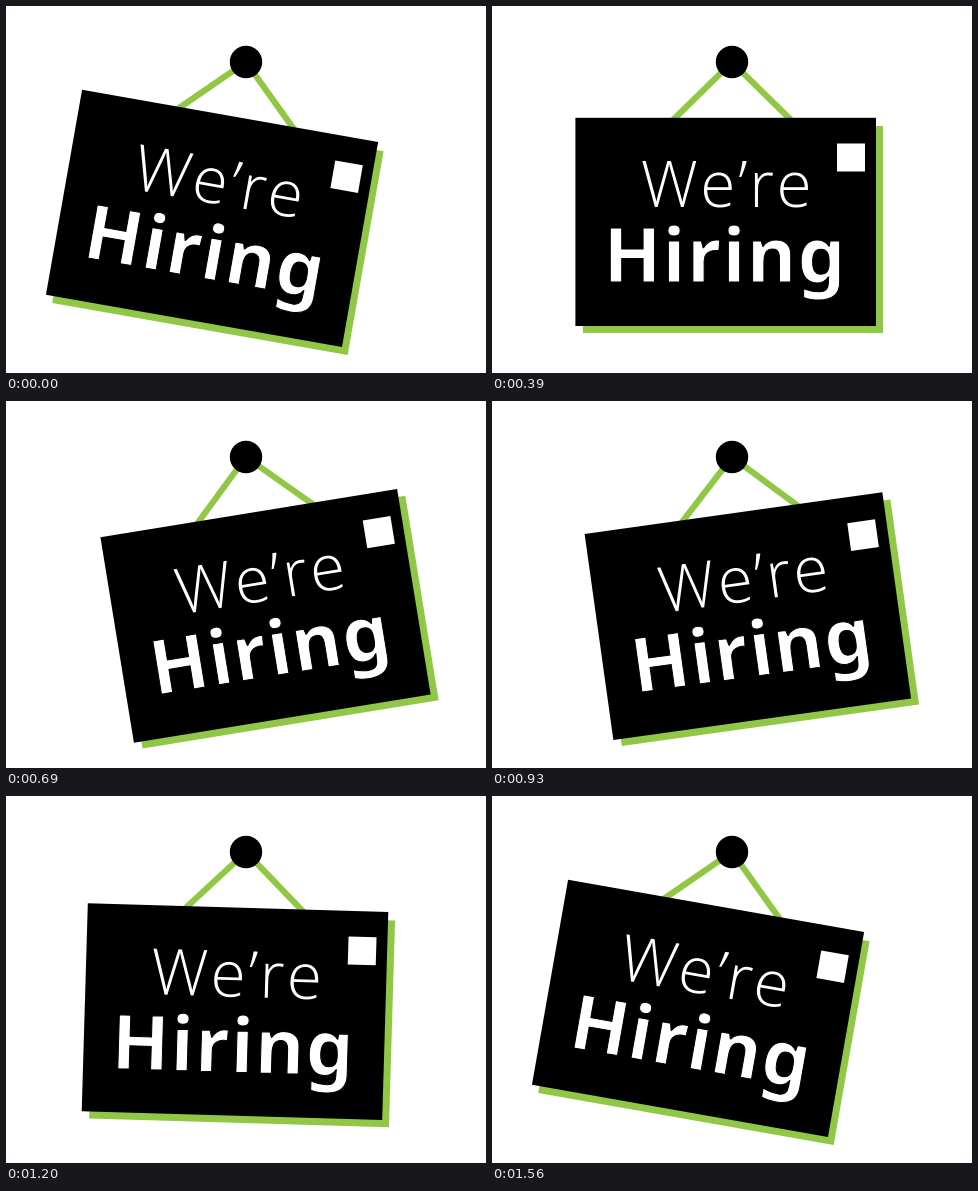
Animation, 480 px wide and 367 px high, one loop 1.59 s. Source, as an HTML page:

```html
<!DOCTYPE html>
<html lang="en">
<head>
<meta charset="utf-8">
<title>We’re Hiring</title>
<style>
  html, body { margin: 0; width: 100%; height: 100%; overflow: hidden; background: #fff; }
  svg { display: block; width: 480px; height: 367px; }
  .green { fill: #90c846; }
  .string { fill: none; stroke: #90c846; stroke-width: 6.2; }
  text { fill: #fff; }
  .light { font: 300 64px "Open Sans", sans-serif; letter-spacing: 3.6px; text-anchor: middle; }
  .bold { font: 700 75.5px "Noto Sans", sans-serif; letter-spacing: 1.3px; stroke: #000; stroke-width: 1; }
</style>
</head>
<body>
<svg viewBox="0 0 480 367">
  <g id="sign">
    <path class="string" d="M181 114 240 56 299 114"/>
    <rect class="green" x="91" y="120" width="300" height="207"/>
    <rect x="83.4" y="111.8" width="300.6" height="208.2"/>
    <text class="light" x="236" y="201">We’re</text>
    <text class="bold" x="111.5" y="276.4">Hiring</text>
    <rect x="345" y="137.5" width="28" height="28" fill="#fff"/>
  </g>
  <circle cx="240" cy="56" r="16.2"/>
</svg>
<script>
  const LOOP = 1590, STEP = 30, TURN = 780, END = 1535, SWING = 10;
  const sign = document.getElementById('sign');

  const ease = p => p * p * (3 - 2 * p);

  function angleAt(t) {
    if (t < TURN) return SWING * (1 - 2 * ease(t / TURN));
    return SWING * (2 * ease(Math.min(1, (t - TURN) / (END - TURN))) - 1);
  }

  function draw(now) {
    // The swing advances in 30 ms steps.
    const t = Math.floor((now % LOOP + 0.01) / STEP) * STEP;
    sign.setAttribute('transform', `rotate(${angleAt(t).toFixed(3)} 240 56)`);
    requestAnimationFrame(draw);
  }
  draw(performance.now());
</script>
</body>
</html>
```
